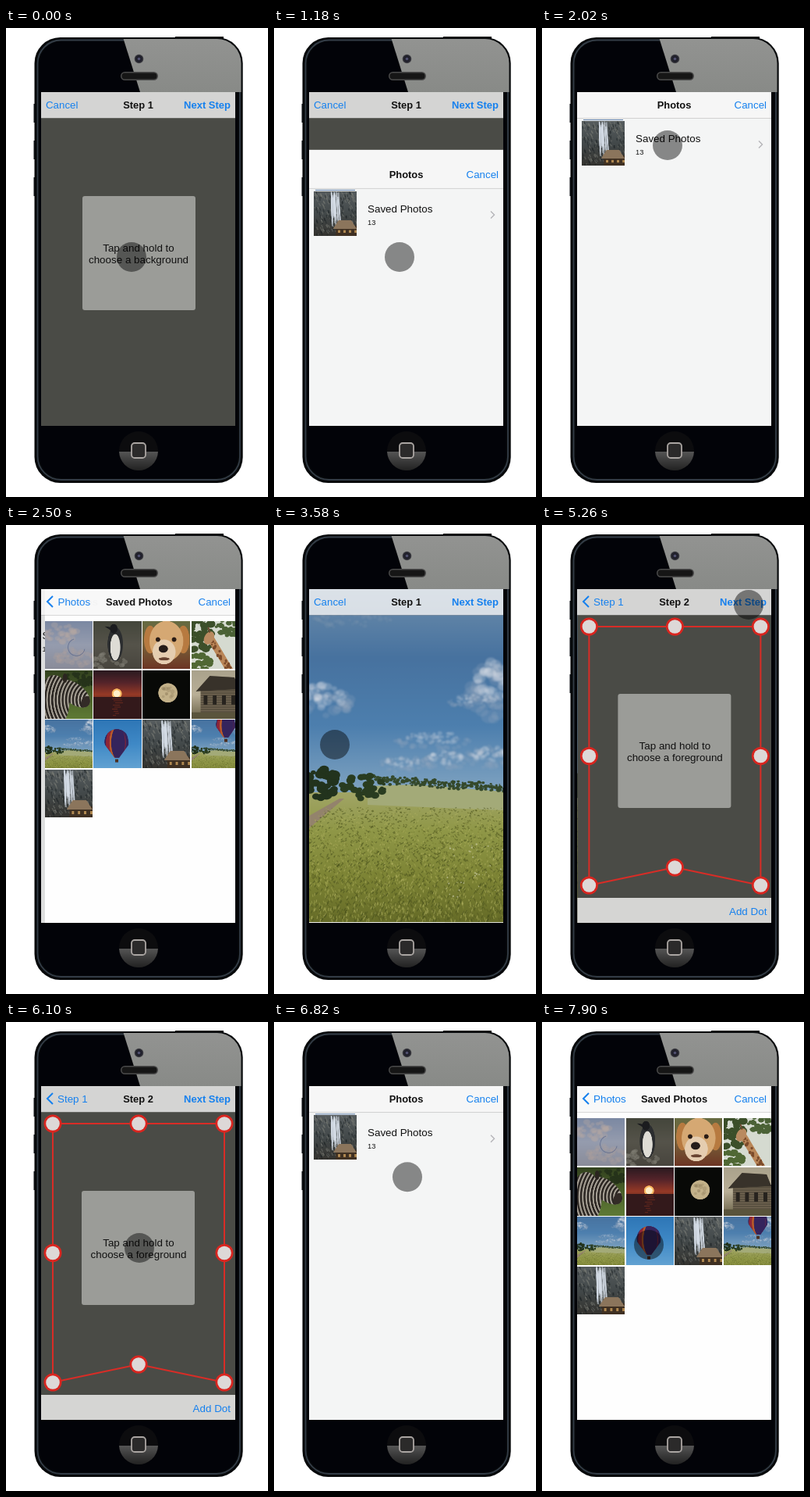
An HTML page with a canvas for the animation above (8 s loop, 336x600 px).

```html
<!DOCTYPE html>
<html lang="en">
<head>
<meta charset="utf-8">
<title>Photo picker demo</title>
<style>
html, body { margin: 0; width: 100%; height: 100%; overflow: hidden; background: #fff; }
canvas { display: block; width: 336px; height: 600px; }
</style>
</head>
<body>
<canvas id="stage"></canvas>
<script>
const LOOP = 8000, TAU = Math.PI * 2, DPR = window.devicePixelRatio || 1;
const SCREEN = { x: 45, y: 82, w: 249, h: 427 };
const BLUE = '#1580ee', FONT = '"Liberation Sans", Arial, sans-serif';
const TIMES = { openFirst: 1018, gridFirst: 2180, choose: 3100, nextStep: 4780, openSecond: 6295, gridSecond: 7250 };
let g; // current drawing context

// ---------- drawing helpers ----------
function setup(canvas, w, h, scale) {
  canvas.width = w * scale;
  canvas.height = h * scale;
  const context = canvas.getContext('2d');
  context.scale(scale, scale);
  return context;
}
function bake(w, h, draw) {
  const canvas = document.createElement('canvas');
  g = setup(canvas, w, h, Math.max(2, DPR));
  draw();
  return canvas;
}
function box(color, x, y, w, h) { g.fillStyle = color; g.fillRect(x, y, w, h); }
function round(color, x, y, w, h, r) {
  g.fillStyle = color; g.beginPath(); g.roundRect(x, y, w, h, r); g.fill();
}
function outline(color, width, x, y, w, h, r) {
  g.strokeStyle = color; g.lineWidth = width;
  g.beginPath(); g.roundRect(x, y, w, h, r); g.stroke();
}
function blob(color, x, y, rx, ry = rx, turn = 0) {
  g.fillStyle = color; g.beginPath(); g.ellipse(x, y, rx, ry, turn, 0, TAU); g.fill();
}
function trace(points) {
  g.beginPath();
  for (let i = 0; i < points.length; i += 2) g.lineTo(points[i], points[i + 1]);
}
function poly(color, ...points) { g.fillStyle = color; trace(points); g.fill(); }
function line(color, width, ...points) {
  g.strokeStyle = color; g.lineWidth = width; trace(points); g.stroke();
}
function shade(y0, y1, ...colors) {
  const fill = g.createLinearGradient(0, y0, 0, y1);
  colors.forEach((c, i) => fill.addColorStop(i / (colors.length - 1), c));
  return fill;
}
function text(str, x, y, { size = 13.4, bold = false, color = '#111', align = 'left' } = {}) {
  g.font = `${bold ? 'bold ' : ''}${size}px ${FONT}`;
  g.textAlign = align; g.fillStyle = color; g.fillText(str, x, y);
}
function shifted(x, y, draw) { g.save(); g.translate(x, y); draw(); g.restore(); }

function scatter(count, seed, draw) {
  const rnd = () => (seed = (seed * 16807) % 2147483647) / 2147483647;
  rnd();
  for (let i = 0; i < count; i++) draw(rnd(), rnd(), rnd());
}
// A heap of round clumps inside an ellipse: clouds and foliage.
function puff(color, x, y, w, h, count = 40) {
  scatter(count, Math.round(x * 7 + y * 31), (a, b, c) => {
    const dx = a * 2 - 1, r = Math.min(w, h) * (0.12 + 0.2 * c);
    blob(color, x + dx * w, y + (b * 2 - 1) * h * Math.sqrt(1 - dx * dx), r * 1.25, r);
  });
}
function cloud(x, y, w, h) {
  puff('rgba(150,168,190,.22)', x, y + h * 0.2, w, h);
  puff('rgba(222,226,232,.26)', x, y - h * 0.1, w * 0.75, h * 0.7);
}

// ---------- photos ----------
const field = bake(SCREEN.w, SCREEN.h, () => {
  g.translate(-SCREEN.x, -SCREEN.y);
  box(shade(82, 345, '#6d8dab', '#47729f', '#4d7fae', '#82a5c2'), 45, 82, 249, 270);
  g.filter = 'blur(2px)';
  puff('rgba(140,160,180,.2)', 100, 122, 50, 10);
  cloud(62, 222, 36, 22);
  cloud(282, 205, 28, 38);
  cloud(258, 224, 34, 9);
  cloud(202, 274, 48, 12);
  for (let i = 0; i < 3; i++) cloud(165 + 55 * i, 304 - 5 * i, 28, 10 + 2 * i);
  g.filter = 'none';

  box(shade(332, 509, '#a5a86c', '#8f9747', '#7d8435', '#646a27'), 45, 342, 249, 167);
  poly('#a3aa78', 120, 334, 180, 332, 294, 341, 294, 365, 120, 358);
  for (let x = 130; x < 298; x += 5) puff('#35492b', x, 325 + (x - 130) * 0.07, 6, 6, 8);
  poly('#93836c', 45, 372, 84, 350, 90, 350, 45, 388);
  puff('#22331d', 60, 328, 20, 22);
  puff('#293c20', 114, 335, 28, 15);

  const greens = ['#535a20', '#a3a552', '#73792e', '#b4b564', '#464f1c'];
  g.globalAlpha = 0.55;
  scatter(3600, 99, (a, b, c) => {
    const x = 45 + 249 * a, y = 362 + 147 * b, size = 0.8 + (y - 362) / 45;
    if (x + y > 430) line(greens[Math.floor(c * 5)], 1.2, x, y, x + (c - 0.5) * 5, y - size);
  });
  scatter(45, 17, (a, b, c) => blob('#dcdcc4', 220 + 74 * a, 408 + 70 * b, 0.4 + 0.8 * c));
});

function fieldTile() {
  const k = field.width / SCREEN.w;
  g.drawImage(field, 0, 93 * k, 249 * k, 249 * k, 0, 0, 62, 62);
}
function balloon(x, y, r) {
  const hues = ['#35245c', '#8e2638', '#b95b2a', '#a32d42', '#3c6b52', '#2b4488', '#35245c'];
  g.save();
  g.beginPath();
  g.arc(x, y, r, Math.PI * 0.92, Math.PI * 0.08);
  g.lineTo(x + 3, y + r * 1.3); g.lineTo(x - 3, y + r * 1.3);
  g.clip();
  hues.forEach((c, i) => {
    const bulge = r * (1 - i / 4);
    blob(c, x + (i - 3) * 0.6, y + r * 0.1, Math.abs(bulge) + 1, r * 1.35);
  });
  g.restore();
  box('#4c3023', x - 2, y + r * 1.42, 4, 4);
}

const drawings = {
  clouds() {
    box(shade(0, 62, '#7b88a2', '#959cae', '#8a8c99'), 0, 0, 62, 62);
    g.filter = 'blur(1px)';
    puff('rgba(184,169,163,.35)', 20, 16, 22, 12);
    puff('rgba(178,162,156,.3)', 40, 46, 26, 12);
    g.filter = 'none';
    g.strokeStyle = 'rgba(80,95,135,.6)'; g.lineWidth = 1;
    g.beginPath(); g.arc(41, 34, 11, 0.2, 4.4); g.stroke();
  },
  penguin() {
    box(shade(0, 62, '#44463b', '#55534a', '#48453e'), 0, 0, 62, 62);
    puff('rgba(130,128,118,.5)', 16, 52, 26, 10);
    blob('#2b2d2f', 28, 30, 10, 22);
    blob('#dedcd5', 28, 34, 6.5, 17);
    blob('#1b1c1f', 26, 10, 5, 6);
    poly('#1b1c1f', 22, 8, 14, 7, 22, 12);
  },
  puppy() {
    box(shade(0, 62, '#666b42', '#77613a', '#6d3524'), 0, 0, 62, 62);
    [10, 53].forEach(x => blob('#b77a40', x, 24, 8, 18));
    blob('#d5a873', 31, 26, 22, 26);
    blob('#e5cdb0', 28, 40, 15, 16);
    [20, 41].forEach(x => blob('#2a1c15', x, 24, 3));
    blob('#251c1a', 27, 36, 6, 5);
    blob('#694431', 28, 49, 7, 2);
  },
  giraffe() {
    box('#d5dad0', 0, 0, 62, 62);
    puff('#3c4f2a', 12, 18, 16, 26);
    puff('#4b6236', 50, 8, 18, 11);
    puff('#506834', 8, 54, 18, 12);
    line('#b98658', 9, 26, 24, 50, 64);
    scatter(24, 21, (a, b, c) => blob('#7c4b2b', 26 + b * 24 + a * 8 - 4, 24 + b * 40, 1 + c));
    blob('#b98a60', 23, 22, 6, 9, 0.5);
    line('#6b4930', 2, 24, 15, 22, 8);
  },
  zebra() {
    box(shade(0, 62, '#33421f', '#4a6029', '#5f7a36'), 0, 0, 62, 62);
    puff('#26331a', 45, 12, 20, 10);
    g.save();
    g.beginPath();
    g.ellipse(12, 40, 20, 34, 0, 0, TAU);
    g.ellipse(38, 30, 24, 13, 0.65, 0, TAU);
    g.clip();
    box('#a39d92', 0, 0, 62, 62);
    g.strokeStyle = '#2a2521'; g.lineWidth = 2.4;
    for (let r = 12; r < 80; r += 4.5) { g.beginPath(); g.arc(62, 38, r, 0, TAU); g.stroke(); }
    blob('#332b27', 56, 42, 9);
    g.restore();
    blob('#2b2520', 26, 10, 3, 6);
  },
  sunset() {
    box(shade(0, 62, '#2a1a20', '#54242a', '#963a26', '#3a1c1c', '#160f12'), 0, 0, 62, 62);
    blob('#f9b860', 30, 30, 6.5);
    blob('#fff0c8', 30, 30, 4.5);
    box('#33191b', 0, 34, 62, 28);
    for (let i = 0; i < 9; i++) box('rgba(180,66,36,.4)', 24 + (i * 7) % 5, 36 + i * 2.7, 12 - i, 1);
  },
  moon() {
    box('#080907', 0, 0, 62, 62);
    blob('#c3b189', 33, 29, 12.5);
    scatter(14, 12, (a, b, c) => blob('rgba(150,132,98,.4)', 26 + 13 * a, 22 + 13 * b, 1 + 2 * c));
  },
  house() {
    box(shade(0, 62, '#aaa28c', '#b9af97', '#6a6248'), 0, 0, 62, 62);
    box('#5a5141', 12, 22, 50, 32);
    poly('#38322a', 6, 27, 24, 7, 56, 9, 62, 24);
    for (let y = 28; y < 54; y += 3) line('#786d58', 0.7, 12, y, 62, y);
    for (let x = 16; x < 60; x += 12) box('#27231e', x, 32, 5, 12);
    box('#5a543c', 0, 54, 62, 8);
  },
  field: fieldTile,
  balloon() {
    box(shade(0, 62, '#2e76b6', '#3f89c6', '#62a2d2'), 0, 0, 62, 62);
    balloon(30, 28, 16);
  },
  waterfall() {
    box(shade(0, 62, '#565c5e', '#43494a', '#34332f'), 0, 0, 62, 62);
    scatter(220, 31, (a, b, c) => {
      line(c > 0.5 ? 'rgba(125,126,120,.45)' : 'rgba(28,34,36,.5)', 1.5, a * 62, b * 62, a * 62 + c * 3, b * 62 + 4);
    });
    scatter(40, 8, (a, b, c) => line('rgba(214,222,232,.5)', 1.5, 25 + 11 * a, 12 * b, 26 + 13 * a, 30 + 20 * c));
    box('#3f3022', 32, 48, 30, 14);
    poly('#8b755c', 28, 52, 36, 40, 54, 40, 62, 52);
    for (let x = 35; x < 60; x += 8) box('#b08850', x, 54, 3, 4);
  },
  fieldBalloon() { fieldTile(); balloon(45, 6, 13); }
};
const photos = Object.fromEntries(Object.entries(drawings).map(([name, draw]) => [name, bake(62, 62, draw)]));
const album = [...Object.keys(photos), 'waterfall'];

// ---------- app pages ----------
function chevron(color, width, x, y, dx, dy) { line(color, width, x, y - dy, x + dx, y, x, y + dy); }

function prompt(x, y, target) {
  box('#4a4b46', 45, 82, 249, 427);
  round('#9b9c98', x, y, 145, 146, 3);
  text('Tap and hold to', 170, y + 71, { align: 'center' });
  text('choose a ' + target, 170, y + 86, { align: 'center' });
}

function dotFrame() {
  const dots = Array.from({ length: 8 }, (_, i) => {
    const side = Math.round(Math.cos(i * TAU / 8)), level = Math.round(Math.sin(i * TAU / 8));
    const raised = side === 0 && level === 1 ? 23 : 0;
    return [170 + 110 * side, 295.5 + 165.5 * level - raised];
  });
  line('#d92c26', 2, ...dots.flat(), ...dots[0]);
  for (const [x, y] of dots) {
    blob('#d9251f', x, y, 11.5);
    blob('#ddd8d7', x, y, 8.8);
  }
}

const stepOne = {
  title: 'Step 1', left: 'Cancel', right: 'Next Step', strong: true,
  body(t) {
    if (t < TIMES.choose) prompt(98, 215, 'background');
    else g.drawImage(field, 45, 82, 249, 427);
  }
};
const stepTwo = {
  title: 'Step 2', back: 'Step 1', right: 'Next Step', strong: true,
  body() {
    prompt(97, 216, 'foreground');
    dotFrame();
    box('#d5d5d3', 45, 477, 249, 32);
    text('Add Dot', 288, 499, { color: BLUE, align: 'right' });
  }
};
const albums = {
  title: 'Photos', right: 'Cancel',
  body() {
    box('#f4f5f5', 45, 66, 249, 443);
    g.drawImage(photos.waterfall, 51, 119, 55, 57);
    box('#5b7ba5', 53, 117, 51, 1);
    text('Saved Photos', 120, 146);
    text('13', 120, 162, { size: 9.3 });
    chevron('#b4b4b8', 1.4, 278, 149, 4.5, 4.5);
  }
};
const grid = {
  title: 'Saved Photos', back: 'Photos', right: 'Cancel',
  body() {
    box('#fefefe', 45, 66, 249, 443);
    album.forEach((name, i) =>
      g.drawImage(photos[name], 45 + (i % 4) * 62.6, 122.7 + Math.floor(i / 4) * 63.3, 61.2, 61.5));
  }
};

function barLabels(page, alpha, shift) {
  g.globalAlpha = alpha;
  text(page.title, 169.5 + shift, 102.5, { size: 12.9, bold: true, align: 'center' });
  if (page.left) text(page.left, 51, 102.5, { size: 13.3, color: BLUE });
  if (page.back) {
    chevron(BLUE, 2, 60, 98, -7, 7);
    text(page.back, 66 + shift * 0.4, 102.5, { color: BLUE });
  }
  text(page.right, 288, 102.5, { size: page.strong ? 13 : 13.3, bold: page.strong, color: BLUE, align: 'right' });
  g.globalAlpha = 1;
}

// Share of the distance still to go: 1 before start, settling to 0.
function spring(t, start) {
  const x = Math.max(0, t - start) * 0.01825;
  return (1 + x) * Math.exp(-x);
}

function navigate(from, to, t, start) {
  const rest = spring(t, start), done = 1 - rest;
  shifted(-75 * done, 0, () => from.body(t));
  box(`rgba(0,0,0,${0.1 * done})`, 45, 66, 249, 443);
  shifted(249 * rest, 0, () => to.body(t));
  box('rgba(247,247,247,.8)', 45, 66, 249, 49);
  box('rgba(150,150,150,.55)', 45, 115, 249, 0.7);
  barLabels(from, rest, -75 * done);
  barLabels(to, done, 62 * rest);
}

function sheet(t, open, push, close) {
  const drop = t < close ? spring(t, open) : 1 - spring(t, close);
  if (drop < 0.999) shifted(0, 443 * drop, () => navigate(albums, grid, t, push));
}

// ---------- finger ----------
const clamp = v => Math.min(1, Math.max(0, v));
const moves = [
  { at: 1380, x: 161, y: 150 },
  { at: 2380, x: 78, y: 281 },
  { at: 3900, x: 265, y: 102 },
  { at: 5400, x: 171, y: 289 },
  { at: 6640, x: 171, y: 150 },
  { at: 7400, x: 137, y: 285 }
];
function finger(t) {
  let x = 161, y = 293;
  for (const move of moves) {
    const u = clamp((t - move.at) / 300), ease = u * u * (3 - 2 * u);
    x += (move.x - x) * ease;
    y += (move.y - y) * ease;
  }
  // Lifted while the photo grid slides in, darker while pressing the bar button.
  const lift = push => clamp((Math.abs(t - push - 300) - 150) / 100);
  const pressing = clamp(1 - Math.abs(t - TIMES.nextStep + 100) / 300);
  const alpha = (0.45 + 0.18 * pressing) * lift(TIMES.gridFirst) * lift(TIMES.gridSecond);
  blob(`rgba(0,0,0,${alpha})`, x, y, 19);
}

// ---------- phone ----------
function phone() {
  box('#fff', 0, 0, 336, 600);
  for (let i = 0; i < 3; i++) box('#15191d', 35.5, 97 + 47 * i, 2, 24);
  box('#0a0a0a', 217, 11, 62, 3);
  round('#07090b', 36.5, 12, 267.2, 570, 33);
  outline('#333c46', 1.8, 40.5, 15.5, 259.5, 562.5, 30);
  round('#020308', 43, 17, 254.5, 559, 28);

  g.save();
  g.beginPath(); g.roundRect(40, 14, 261.5, 565, 31); g.clip();
  poly(shade(14, 82, '#929391', '#888a87'), 150, 12, 303, 12, 303, 82, 172, 82);
  g.restore();

  blob('#3b3b40', 170.5, 39.5, 5.8);
  blob('#20202b', 170.5, 39.5, 4.5);
  blob('#50506f', 170.5, 39.5, 1.8);
  round('#4a4a4a', 147, 56, 48, 11, 5.5);
  round('#161616', 148.5, 57.5, 45, 8, 4);

  blob('#0c0c0e', 170, 541, 25);
  g.fillStyle = shade(542, 566, '#555', '#3a3a3a', '#222');
  g.beginPath(); g.arc(170, 541, 25, 0.04, Math.PI - 0.04); g.fill();
  round('#2b2a2a', 161, 531, 18, 19, 4);
  outline('#aaa5a2', 1.8, 161, 531, 18, 19, 4);
}

const stage = setup(document.getElementById('stage'), 336, 600, DPR);

function render(t) {
  g = stage;
  phone();
  g.save();
  g.beginPath(); g.rect(SCREEN.x, SCREEN.y, SCREEN.w, SCREEN.h); g.clip();
  navigate(stepOne, stepTwo, t, TIMES.nextStep);
  sheet(t, TIMES.openFirst, TIMES.gridFirst, TIMES.choose);
  sheet(t, TIMES.openSecond, TIMES.gridSecond, Infinity);
  finger(t);
  g.restore();
}

const began = performance.now();
function tick() {
  render((performance.now() - began) % LOOP);
  requestAnimationFrame(tick);
}
tick();
</script>
</body>
</html>
```
